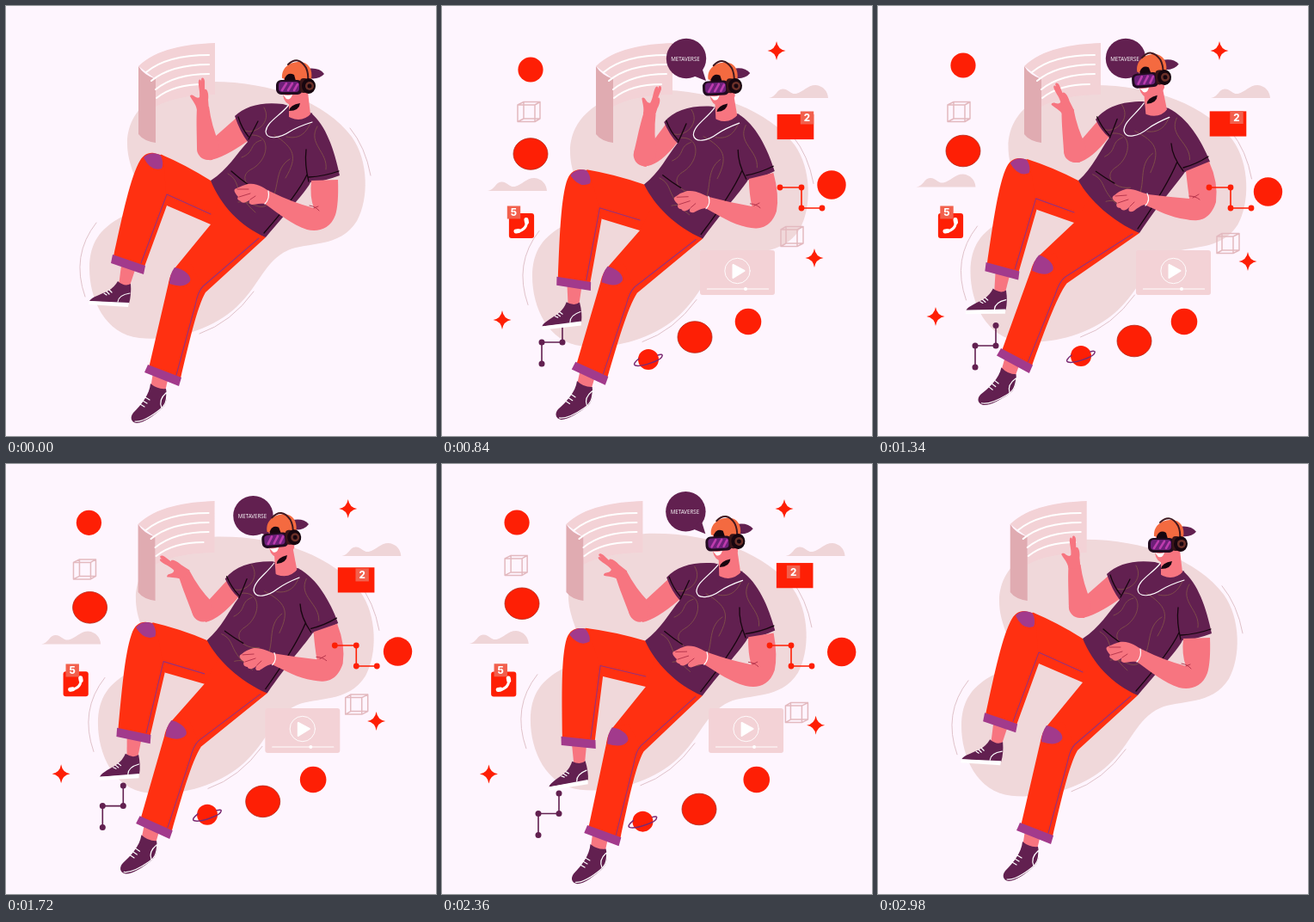
Animation, 500 px wide and 500 px high, one loop 3 s. Source, as an HTML page:

```html
<!DOCTYPE html>
<html lang="en">
<head>
<meta charset="utf-8">
<title>Metaverse</title>
<style>
html, body { margin: 0; width: 100%; height: 100%; overflow: hidden; background: #fef5fe; }
svg { display: block; width: 100vw; height: 100vh; }
.skin { fill: #f77580; }
.pants { fill: #ff3011; }
.trim { fill: #a23a8c; }
.plum { fill: #622050; }
.red { fill: #fe1f05; }
.pale { fill: #f3d2d6; }
.line { fill: none; stroke-linecap: round; stroke-linejoin: round; }
.seam { stroke: #97307a; stroke-width: 1.1; }
.ink { stroke: #17060f; stroke-width: 1.3; }
.white { stroke: #fff; stroke-width: 1.2; }
.cube { stroke: #e3b9bf; stroke-width: 1.5; }
text { fill: #fff; text-anchor: middle; }
.num { font: 800 11.5px Inter, "Open Sans", sans-serif; }
.word { font: 6.2px "Open Sans", "Noto Sans", sans-serif; }
</style>
</head>
<body>
<svg viewBox="0 0 500 500">
  <g id="blob">
    <path fill="#f0d8da" d="M141 160C141 112 190 88 240 88C310 88 372 112 402 152C422 180 422 225 408 250C388 282 350 274 328 284C300 297 295 325 268 350C240 376 195 390 155 386C115 382 97 340 97 305C97 275 110 258 135 245C175 222 141 200 141 160Z"/>
    <path class="line" stroke="#dcbcc3" stroke-width=".9" d="M400 142Q418 164 424 197M105 252Q75 290 92 338M288 332Q262 368 225 381"/>
  </g>
  <g id="panel">
    <path class="pale" d="M154 70C174 50 210 44 243 43V103C215 103 190 108 174 117V85Z"/>
    <path fill="#e0abb1" d="M154 70Q160 80 174 85V159Q160 157 154 149Z"/>
    <path class="line" stroke="#fff" stroke-width="2" d="M163 77C182 61 210 57 236 57M169 87C186 73 212 68 236 68M174 97C190 84 213 79 236 79M175 107C190 95 212 91 230 91"/>
  </g>
  <g id="back"></g>
  <g id="person">
    <path id="thigh1" class="pants"/>
    <g id="shin1">
      <path class="skin" d="M134 302L131 325H144L150 307Z"/>
      <path class="plum" d="M130 320Q138 327 145 323Q146 336 143 346L97 343C100 338 112 335 119 331Q126 327 130 320Z"/>
      <path fill="#fff" d="M97 343L143 345L142 350L96 347Z"/>
      <path class="line white" d="M114 334L117 336M117 332L120 335M120 330L123 333M130 344Q131 336 144 334"/>
      <path class="pants" d="M187 232L161 303L125 291C133 255 143 205 154 183C159 173 165 170 172 171L183 174Z"/>
      <path class="trim" d="M160 176C165 170 175 170 180 174Q184 183 181 189Q168 193 160 176Z"/>
      <path class="trim" d="M124 289L162 302L160 312L122 299Z"/>
    </g>
    <path id="seam1" class="line seam"/>
    <path id="thigh2" class="pants"/>
    <g id="shin2">
      <path class="skin" d="M171 426L168 445L185 448L189 431Z"/>
      <path class="plum" d="M168 439Q176 446 186 445C188 455 187 464 180 469C172 476 160 485 152 485C145 484 144 478 148 473C157 464 167 452 168 439Z"/>
      <path class="line white" d="M187 449C187 461 184 466 178 470C169 477 159 484 150 483M156 463L161 466M159 459L164 462M162 455L167 458M181 467Q177 458 186 450"/>
      <path class="pants" d="M197 304C192 310 190 316 189 322L166 421L203 433C212 395 222 350 232 333L215 300Z"/>
      <path class="trim" d="M196 304C208 306 216 314 214 320Q208 329 190 323Q190 312 196 304Z"/>
      <path class="trim" d="M165 417L204 432L201 442L161 426Z"/>
    </g>
    <path id="seam2" class="line seam"/>
    <path id="upperArm" class="skin"/>
    <g id="forearm">
      <circle class="skin" cx="235" cy="166" r="13"/>
      <path class="skin" d="M222 118C221 135 222 148 222 164C223 175 232 180 240 179L248 160Q239 140 236 117Z"/>
    </g>
    <path id="hand" class="skin" d="M222 121C221 114 216 109 214 105C214 103 217 103 219 105Q223 108 225 106C226 99 223 92 224 87C225 84 227 86 227 88L227 85C228 82 231 84 231 88L231 97C234 95 236 103 235 109L236 121Z"/>
    <path id="shirt" class="plum"/>
    <g id="details">
      <path class="line" stroke="#80504a" stroke-width=".9" d="M300 118C310 135 290 150 278 145M286 150C310 150 305 180 285 190C270 198 280 215 300 215M330 178C310 190 320 215 305 230C295 240 285 225 270 228M362 140C350 160 375 170 372 190M312 150C335 165 340 175 325 200M258 195C275 205 262 215 290 240M326 152C342 156 350 146 354 136M274 176C290 170 282 160 297 156"/>
      <path class="line ink" d="M293 134Q287 146 282 155M262 192Q272 201 282 208M270 129Q274 142 282 152"/>
    </g>
    <path id="sleeveInk" class="line ink"/>
    <g id="neck">
      <path class="skin" d="M329 105L351 100L354 126Q348 139 329 132Z"/>
      <path class="plum" d="M322 124Q341 140 356 124L357 134Q340 146 320 130Z"/>
      <path class="line white" d="M328 116C318 128 303 135 302 146C303 156 318 154 330 146Q340 140 356 135"/>
    </g>
    <g id="head">
      <path class="plum" d="M350 73Q364 71 370 79Q364 86 352 84Z"/>
      <path class="skin" d="M323 82H352L351 105Q346 115 334 116Q323 114 322 103Z"/>
      <path fill="#17060f" d="M329 122Q330 115 342 113Q341 122 329 122Z"/>
      <path fill="#f46a40" d="M321 84C320 70 332 65 341 65C352 65 357 74 355 85L345 88Z"/>
      <path fill="#17060f" d="M324 84Q328 76 335 80L337 87H324Z"/>
      <path class="line" stroke="#401820" stroke-width="2" d="M328 68Q340 57 349 72Q352 79 351 87"/>
      <path fill="#fff" d="M322 103Q328 105 333 103Q331 110 326 108Z"/>
      <rect x="314" y="86" width="31" height="17" rx="6" fill="#220b20"/>
      <rect x="317" y="88" width="24" height="12" rx="4" fill="#6d2079"/>
      <path class="line" stroke="#bd3cae" stroke-width="2.6" d="M321 98L326 90M328 98L333 90M335 98L339 91"/>
      <rect x="342" y="84" width="9" height="17" rx="4" fill="#3a1518"/>
      <ellipse cx="352" cy="93" rx="8" ry="9" fill="#17060f"/>
      <circle cx="353" cy="93" r="5" fill="#6b3029"/><circle cx="353" cy="93" r="2.5" fill="#17060f"/>
    </g>
    <path id="arm" class="skin"/>
    <path id="armInk" class="line" stroke="#b03048" stroke-width=".9"/>
    <path id="bracelet" class="line white"/>
  </g>
  <g id="front"></g>
</svg>
<script>
const LOOP = 3000;
const $ = id => document.getElementById(id);
const set = (id, d) => $(id).setAttribute('d', d);

// Monotone cubic interpolation, clamped at both ends.
function ease(T, V, t) {
  const n = T.length - 1;
  if (t <= T[0]) return V[0];
  if (t >= T[n]) return V[n];
  let i = 0;
  while (t > T[i + 1]) i++;
  const rate = k => (V[k + 1] - V[k]) / (T[k + 1] - T[k]);
  const slope = k => {
    if (k < 1 || k >= n) return 0;
    const a = rate(k - 1), b = rate(k);
    return a * b > 0 ? 2 * a * b / (a + b) : 0;
  };
  const h = T[i + 1] - T[i], u = (t - T[i]) / h, w = 1 - u;
  return V[i] * w * w * (1 + 2 * u) + V[i + 1] * u * u * (3 - 2 * u)
    + h * u * w * (slope(i) * w - slope(i + 1) * u);
}

const DRIFT = [440, 840, 1340, 2120, 2620];
const CYCLE = [-380, 0, ...DRIFT, 3000, 3440];
const cyclic = (v, t) => ease(CYCLE, [v[5], ...v, v[0], v[1]], t);

// Blends two path strings of the same structure.
function morph(a, b, p, dy) {
  const to = b.match(/-?[\d.]+/g);
  let i = 0;
  return a.replace(/-?[\d.]+/g, v => {
    const r = +v + (to[i] - v) * p + (i % 2 ? dy : 0);
    i++;
    return r.toFixed(2);
  });
}

// Joints: the first x and y are the pivot in the rest pose.
const joints = {
  blob: { x: [0, 3, 8, 10.5, 8.5, 2.5], y: [0, 5.5, 9.5, 4, -9, -4], r: [0, 0, 0, 0, 0, 0] },
  panel: { x: [0, 11, 25, 16, -13, -4], y: [0, 0, 0, 0, 0, 0], r: [0, 0, 0, 0, 0, 0] },
  shin1: { x: [172, 162, 162, 166, 161, 161], y: [181, 206, 200, 187, 201, 200], r: [0, -13, -10, -4, -11.5, -13.8] },
  shin2: { x: [201, 211, 197, 191, 203, 203], y: [314, 329, 313, 300, 317, 315], r: [0, -6.5, 3.2, 6.8, -1.2, -1] },
  forearm: { x: [234, 240, 235, 228, 228, 231], y: [165, 170, 172, 168, 172, 167], r: [0, 25, 14, -3, -31, -5] },
  head: { x: [351, 348, 340, 332, 339, 348], y: [93, 97, 93, 83, 89, 91], r: [0, -4, -3, -5, -4, -1] }
};
const crotch = { x: [238, 241, 230, 228, 235, 238], y: [254, 264, 261, 252, 260, 257] };
const lean = [0, .25, .6, 1, .6, .15];
const bob = [0, 7, 4.5, 0, 4, .5];
const handTurn = [0, 32, 22, -22, -71, -14];

const poses = {
  shirt: ['M266 128C278 116 298 111 322 114L354 124C372 138 382 168 388 197Q370 204 354 205C352 212 328 238 302 269C272 256 250 232 238 203C258 190 268 172 281 158Q272 146 266 128Z',
    'M253 132C265 117 283 111 308 111L338 119C360 130 376 156 386 181Q372 190 357 193C348 206 328 228 304 264C272 250 246 226 233 203C250 188 258 168 269 153Q260 146 253 132Z'],
  sleeveInk: ['M349 167Q347 184 352 204M352 199Q370 198 387 192M350 196Q340 218 300 264',
    'M341 160Q342 175 355 192M355 188Q370 184 384 175M348 181Q336 210 302 259'],
  arm: ['M355 203L386 202Q387 230 383 243C377 260 362 263 350 260C332 254 318 242 301 230C293 229 290 231 286 231C282 230 282 227 284 225C278 230 274 229 273 227C270 226 268 224 270 222C265 216 264 213 268 212Q274 209 281 207C292 205 300 212 308 216Q332 228 358 235Q353 222 355 203Z',
    'M358 192L385 181Q396 205 393 228C386 250 372 251 358 248C340 246 326 238 310 231C303 233 300 237 296 239C290 240 291 236 293 233C288 239 283 238 282 235C278 235 276 232 278 229C272 225 271 222 275 220Q280 215 288 213C298 212 306 217 314 219Q338 222 362 224Q360 210 358 192Z'],
  armInk: ['M353 232Q360 233 364 238M358 235L363 233M269 213L282 213M271 222L284 218M284 225L290 221',
    'M362 221Q369 221 374 225M366 223L373 219M276 221L289 220M279 229L291 225M293 233L298 228'],
  bracelet: ['M301 230Q307 224 305 215', 'M311 232Q317 226 313 218']
};

function poseOf(name, t) {
  const j = joints[name];
  return { x: cyclic(j.x, t), y: cyclic(j.y, t), r: cyclic(j.r, t), px: j.x[0], py: j.y[0] };
}
function place(id, q) {
  $(id).setAttribute('transform', `translate(${q.x} ${q.y}) rotate(${q.r}) translate(${-q.px} ${-q.py})`);
}
function at(q, x, y) {
  const a = q.r * Math.PI / 180, c = Math.cos(a), s = Math.sin(a);
  x -= q.px; y -= q.py;
  return [q.x + x * c - y * s, q.y + x * s + y * c];
}

function drawPerson(t) {
  const q = {};
  for (const name in joints) place(name, q[name] = poseOf(name, t));
  const p = cyclic(lean, t), dy = cyclic(bob, t);
  for (const id in poses) set(id, morph(...poses[id], p, dy));
  place('details', { x: 304 - 10 * p, y: 181.5 - 4 * p + dy, r: -6 * p, px: 304, py: 181.5 });
  place('neck', { x: 338 - 18 * p, y: 125 - 4 * p + dy, r: -5 * p, px: 338, py: 125 });

  const hemL = [238 - 5 * p, 203 + dy], hemR = [302 + 2 * p, 269 - 5 * p + dy];
  const fork = [cyclic(crotch.x, t), cyclic(crotch.y, t)];
  const k1 = (x, y) => at(q.shin1, x, y), k2 = (x, y) => at(q.shin2, x, y);
  const knee = k1(180, 172.5);
  const mid = [(knee[0] + hemL[0]) / 2, (knee[1] + hemL[1]) / 2 - 3];
  set('thigh1', `M${hemL}Q${mid} ${knee}L${k1(170, 200)}L${k1(187, 232)}L${fork}L${[280, 240 + dy]}Z`);
  set('seam1', `M${[fork[0], fork[1] - 12]}L${k1(187, 219)}L${k1(157, 299)}`);
  set('thigh2', `M${hemR}L${k2(232, 333)}L${k2(189, 322)}L${k2(197, 304)}L${fork}L${[250, 218 + dy]}Z`);
  set('seam2', `M${[hemR[0] - 8, hemR[1] + 1]}L${k2(229, 326)}Q${k2(223, 332)} ${k2(220, 348)}L${k2(198, 429)}`);

  const e = q.forearm;
  set('upperArm', `M${[269 - 13 * p, 129 + 4 * p + dy]}L${[e.x + 9, e.y - 13]}L${[e.x, e.y]}L${[e.x + 4, e.y + 14]}Q${[e.x + 20, e.y + 11]} ${[281 - 12 * p, 157 - 5 * p + dy]}Z`);
  const [wx, wy] = at(e, 229, 118);
  place('hand', { x: wx, y: wy, r: cyclic(handTurn, t), px: 229, py: 118 });
}

// Floating objects, drawn around their own centre.
const disc = r => `<circle class="red" r="${r}"/>`;
const coin = '<ellipse class="red" rx="20" ry="18.3" stroke="#b5281a" stroke-width=".8"/>';
const star = '<path class="red" d="M0-11Q1.5-1.5 10.5 0Q1.5 1.5 0 11Q-1.5 1.5-10.5 0Q-1.5-1.5 0-11Z"/>';
const cube = '<path class="line cube" d="M-6-11.5H13V8H-6ZM-13-8H7V11.5H-13ZM-13-8L-6-11.5M7-8L13-11.5M7 11.5L13 8M-13 11.5L-6 8"/>';
const hills = '<path fill="#efd5d8" d="M-34.5 0C-26-1-25-11-18-10.5C-11-10-9-4-3-5C6-7 10-15 20-15C29-14 34-8 34.5 0Z"/>';
const badge = n => `<rect x="-7.7" y="-7.5" width="15.4" height="15" fill="#f2604d"/><text class="num" y="4.2">${n}</text>`;
const circuit = (pts, color, r) => `<path class="line" stroke="${color}" stroke-width="1.6" d="M${pts.join('L')}"/>`
  + pts.map(([x, y]) => `<circle cx="${x}" cy="${y}" r="${r}" fill="${color}"/>`).join('');

const items = [];
// `left` is the opacity still left at 2620 ms; `early` advances the pop-in.
function add(art, x, y, left = 1, early = 0, layer = 'back') {
  const el = document.createElementNS('http://www.w3.org/2000/svg', 'g');
  el.innerHTML = art;
  $(layer).append(el);
  items.push({ el, x, y, early, fade: 2620 - (1 - left) * 240 });
}

add(disc(14.6), [105, 103, 99, 93, 82], [77, 74, 69, 68, 68], .65, -210);
add(cube, [107, 101, 94, 89, 84], [123, 123, 123, 121, 115], .7);
add(coin, [106, 103, 99, 96, 90.5], [175, 172, 168.5, 165, 160]);
add(hills, [93, 87.5, 79, 72, 61.5], [219, 215, 210.5, 209, 209], .9);
add('<rect class="red" x="-14.6" y="-14.6" width="29.2" height="29.2" rx="3"/>'
  + '<path class="line" stroke="#fff" stroke-width="3" d="M6-7Q7 5-6 7"/><path class="line" stroke="#fff" stroke-width="5" d="M5.5-7L6-4M-6.5 6.5L-3.5 6"/>',
  [98.5, 92.5, 84.5, 77.5, 67], [255.5, 255.5, 255.5, 256, 256], .8);
add(badge(5), [87, 83.5, 80, 73.5, 64], [240, 240, 240, 240, 239.5], .65);
add(star, [73, 70, 67, 60, 50], [368, 365, 361, 360, 361]);
add(circuit([[0, 25], [0, 0], [24, 0], [24, -23.5]], '#622050', 3.5), [117, 116, 113, 112, 112], [388, 391, 395, 401, 411]);
add(disc(12) + '<path class="line" stroke="#7a2a72" stroke-width="1.5" d="M-11-1C-16 3-18 6-15 7C-9 9 16 1 16-4C17-6 14-6 11-5"/>',
  [243, 240, 236, 233, 234], [414, 411, 407, 410, 421]);
add(coin, [290, 294, 298, 299, 299], [383, 385, 389.5, 396, 406], .75);
add(disc(15.3), [358, 356, 356, 360, 371], [373, 367, 367, 367, 367], .68);
add('<rect class="pale" x="-43.5" y="-26" width="87" height="52" rx="3"/><circle class="line" cy="-2" r="14.7" stroke="#fff" stroke-width=".9"/>'
  + '<path fill="#fff" stroke="#fff" stroke-width="2" stroke-linejoin="round" d="M-5-9L8-2L-5 6Z"/>'
  + '<path class="line white" d="M-35 19H36"/><circle cx="9.5" cy="19" r="2" fill="#fff"/>',
  [343, 343.5, 343.5, 348, 358.5], [307, 310, 310, 310, 310], .55);
add(star, [437, 433, 430, 432, 437], [290, 293, 297, 301, 306], .7);
add(`<g transform="scale(-1)">${cube}</g>`, [408, 407, 407, 409.5, 415], [262, 268, 276, 283.5, 293.5], .7);
add(disc(16.7), [454, 453, 453.5, 459.5, 469], [202, 208, 216, 219, 218], .85);
add('<rect class="red" x="-21.3" y="-14.6" width="42.6" height="29.2"/>',
  [414.5, 411, 407, 407.5, 413], [143, 140.5, 137, 132.5, 127.5]);
add(badge(2), [431, 424.5, 417, 411.5, 406.5], [129, 130, 129.5, 128, 123]);
add(hills, [408, 414.5, 421.5, 428.5, 438.5], [108, 107, 107, 107, 107], .55);
add(star, [382, 389, 397, 398, 398], [52, 52, 52, 52, 52], .7);
add('<circle class="plum" r="23.2"/><path class="plum" d="M8 20L23 26L18 10Z"/><text class="word" x="-1" y="3.2">METAVERSE</text>',
  [281, 284, 288, 286, 281], [60, 61, 61, 58, 53], .62);
add(circuit([[0, 0], [25, 0], [25, 24], [49, 24]], '#fe1f05', 3.4),
  [399, 393, 385, 381, 381], [212, 211, 211, 211, 211], .6, -175, 'front');

function drawItems(t) {
  for (const { el, x, y, early, fade } of items) {
    const scale = ease([120, 430, 620], [0, 1.18, 1], t - early * .6);
    const opacity = Math.min(1, Math.max(0, 1 - (t - fade) / 240));
    el.setAttribute('transform', `translate(${ease(DRIFT, x, t)} ${ease(DRIFT, y, t)}) scale(${scale})`);
    el.setAttribute('opacity', opacity);
  }
}

function frame() {
  const t = performance.now() % LOOP;
  drawPerson(t);
  drawItems(t);
  requestAnimationFrame(frame);
}
frame();
</script>
</body>
</html>
```
